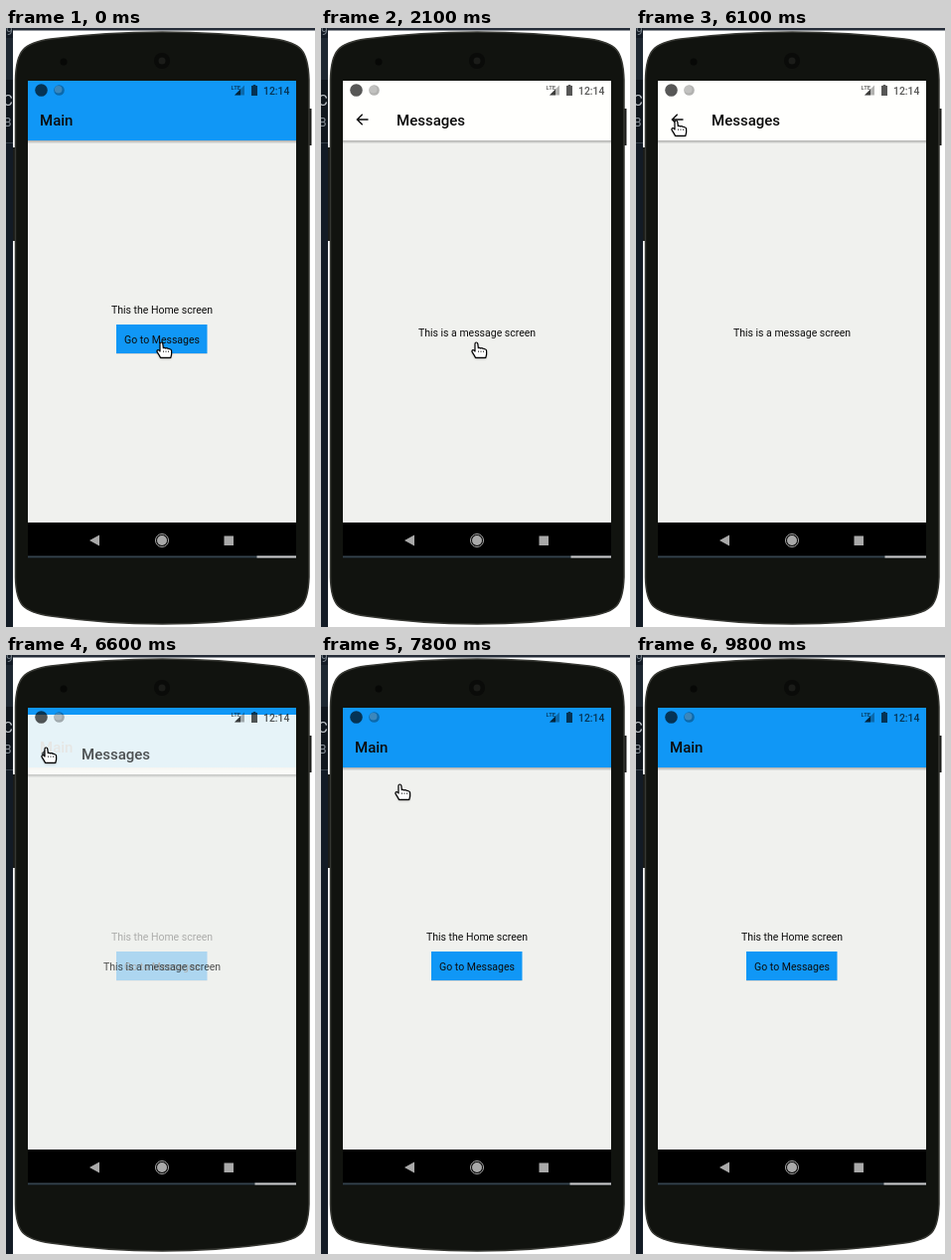
Animation, 311 px wide and 602 px high, one loop 9.9 s. Source, as an HTML page with a canvas:

```html
<!DOCTYPE html>
<html lang="en">
<head>
<meta charset="utf-8">
<title>Phone navigation</title>
<style>
html, body { margin: 0; width: 100%; height: 100%; overflow: hidden; background: #fff; }
canvas { display: block; }
</style>
</head>
<body>
<canvas id="stage" width="311" height="602"></canvas>
<script>
const ctx = document.getElementById('stage').getContext('2d');
const LOOP = 9900, STEP = 100;
const SCREEN = { x: 22, y: 53, w: 270, h: 480 };
const BLUE = '#1097f6', PAPER = '#f0f1ee', INK = '#0c0c0c';

// Pointer stops: time, left, top
const POINTER = [
  [0, 151, 315], [4400, 151, 315], [4500, 151, 314], [4600, 143, 300],
  [4800, 90, 203], [4900, 81, 186], [5100, 81, 186], [5200, 81, 185],
  [5300, 81, 185], [5500, 66, 155], [5700, 43, 106], [5800, 39, 98],
  [5900, 39, 98], [6100, 35, 92], [6800, 35, 92], [7300, 62, 217],
  [7700, 62, 217], [7800, 74, 129], [8000, 76, 84], [8100, 76, 84],
  [8600, 42, 24], [8900, 52, 32], [9000, 52, 32], [9100, 46, 23]
];
const POINTER_GONE = 9200;

// Messages card: start time, opacity, downward offset
const CARD = [
  [0, 0, 0], [1300, 0.08, 28], [1500, 0.85, 4], [1600, 1, 0],
  [6600, 0.7, 7], [6700, 0.12, 22], [6800, 0, 0]
];

// Start of the light part of the bottom line
const LINE = [[0, 252.5], [2100, 251.5], [5500, 250.5], [8500, 249.5]];

const current = (list, t) => list.filter(k => k[0] <= t).pop();

function rect(x, y, w, h, fill) {
  ctx.fillStyle = fill;
  ctx.fillRect(x, y, w, h);
}

function disc(x, y, r, fill) {
  ctx.fillStyle = fill;
  ctx.beginPath();
  ctx.arc(x, y, r, 0, Math.PI * 2);
  ctx.fill();
}

function poly(points, fill) {
  ctx.fillStyle = fill;
  ctx.beginPath();
  points.forEach(([x, y]) => ctx.lineTo(x, y));
  ctx.closePath();
  ctx.fill();
}

function text(str, x, y, size, weight = 400, fill = INK, align = 'left') {
  ctx.font = `${weight} ${size}px Roboto, sans-serif`;
  ctx.textAlign = align;
  ctx.fillStyle = fill;
  ctx.fillText(str, x, y);
}

function shade(x, y, w, h, alpha) {
  const g = ctx.createLinearGradient(0, y, 0, y + h);
  g.addColorStop(0, `rgba(0,0,0,${alpha})`);
  g.addColorStop(1, 'rgba(0,0,0,0)');
  rect(x, y, w, h, g);
}

function drawBackdrop() {
  rect(0, 0, 311, 602, '#fff');
  rect(0, 0, 311, 2.5, '#252c38');
  rect(0, 0, 7, 602, '#131b25');
  rect(0, 10, 7, 42, '#1d2731');
  rect(0, 52, 7, 63, '#10161d');
  rect(0, 115, 7, 1, '#3a434c');
  text('9', 0, 7, 12, 400, '#77808a');
  ctx.save();
  ctx.beginPath();
  ctx.rect(0, 0, 7, 116);
  ctx.clip();
  text('C', -3, 78, 15, 400, '#c3c8cd');
  text('B', -2, 99, 12, 400, '#8a929a');
  ctx.restore();
}

function drawPhone() {
  rect(304, 81, 3.5, 37, '#1a1b18');
  rect(7, 120, 4, 94, '#1a1b18');
  ctx.beginPath();
  ctx.moveTo(9.5, 52);
  ctx.bezierCurveTo(10, 22, 18, 15, 45, 11);
  ctx.quadraticCurveTo(157, -3, 270, 11);
  ctx.bezierCurveTo(297, 15, 304, 22, 305, 52);
  ctx.lineTo(305, 552);
  ctx.bezierCurveTo(304, 580, 298, 587, 270, 591);
  ctx.quadraticCurveTo(157, 607, 45, 591);
  ctx.bezierCurveTo(17, 587, 10, 580, 9.5, 552);
  ctx.closePath();
  ctx.fillStyle = '#11130f';
  ctx.fill();
  ctx.strokeStyle = '#363732';
  ctx.lineWidth = 1.5;
  ctx.stroke();
  disc(58, 34, 3.5, '#070806');
  disc(157, 33, 8, '#0a0b09');
  disc(157, 33, 3.5, '#1b1c19');
}

function drawHeader(fill) {
  rect(22, 53, 270, 60, fill);
  shade(22, 113, 270, 3.5, 0.28);
}

function drawHome() {
  rect(22, 53, 270, 444, PAPER);
  drawHeader(BLUE);
  text('Main', 34, 98, 15, 500);
  text('This the Home screen', 157, 287, 10.5, 400, INK, 'center');
  shade(111, 327, 91.5, 1.5, 0.15);
  rect(111, 298, 91.5, 29, BLUE);
  text('Go to Messages', 157, 316.5, 10.5, 400, INK, 'center');
}

function drawMessages(alpha, offset) {
  ctx.save();
  ctx.globalAlpha = alpha;
  ctx.translate(0, offset);
  rect(22, 53, 270, 444, PAPER);
  drawHeader('#fffffd');
  text('Messages', 76, 98, 15, 500);
  text('This is a message screen', 157, 309.5, 10.5, 400, INK, 'center');
  ctx.strokeStyle = INK;
  ctx.lineWidth = 1.4;
  ctx.beginPath();
  ctx.moveTo(47.5, 92);
  ctx.lineTo(36.5, 92);
  ctx.moveTo(41.7, 86.7);
  ctx.lineTo(36.4, 92);
  ctx.lineTo(41.7, 97.3);
  ctx.stroke();
  ctx.restore();
}

function drawStatus() {
  const dark = 'rgba(0,0,0,.66)', mid = 'rgba(0,0,0,.3)';
  disc(35.5, 62.5, 6.3, dark);
  disc(53.5, 62.5, 5.3, mid);
  disc(52.7, 61.7, 3.8, 'rgba(255,255,255,.2)');
  text('LTE', 226.5, 61.5, 6, 500, dark);
  poly([[240, 57.5], [240, 67.5], [230, 67.5]], mid);
  poly([[236, 61.5], [236, 67.5], [230, 67.5]], dark);
  rect(247, 58, 6, 10, dark);
  rect(248.7, 57, 2.6, 1, dark);
  text('12:14', 259, 66.5, 10.4, 500, dark);
}

function drawNav(split) {
  const grey = '#a9a9a9';
  rect(22, 497, 270, 36, '#000');
  poly([[84, 515], [94, 509.5], [94, 520.5]], grey);
  disc(157, 515, 5, grey);
  ctx.strokeStyle = grey;
  ctx.lineWidth = 1;
  ctx.beginPath();
  ctx.arc(157, 515, 6.5, 0, Math.PI * 2);
  ctx.stroke();
  rect(219.5, 510.5, 9.5, 9.5, grey);
  rect(22, 530.5, 270, 2, '#34434d');
  rect(split, 530.5, 292 - split, 2, '#c9c9c9');
}

function pointerAt(t) {
  const i = POINTER.findIndex(k => k[0] > t);
  if (i < 0) return POINTER[POINTER.length - 1].slice(1);
  const [t0, x0, y0] = POINTER[i - 1], [t1, x1, y1] = POINTER[i];
  const p = (t - t0) / (t1 - t0);
  return [Math.round(x0 + (x1 - x0) * p), Math.round(y0 + (y1 - y0) * p)];
}

function drawPointer(x, y) {
  const hand = new Path2D(
    'M4 9V2.4Q4 1 5.3 1Q6.6 1 6.8 2.4L7.3 6.6Q8.6 5.8 9.7 7Q11 6.3 12.2 7.4' +
    'Q13.4 6.9 14.3 8Q15.6 8 15.6 9.6V13L14.8 16.4H4.6L2.9 13.4L1 10.4' +
    'Q.6 9 2 8.7Q3 8.6 4 10Z');
  ctx.save();
  ctx.translate(x, y);
  ctx.save();
  ctx.shadowColor = 'rgba(0,0,0,.4)';
  ctx.shadowBlur = 2;
  ctx.shadowOffsetY = 1;
  ctx.fillStyle = '#fff';
  ctx.fill(hand);
  ctx.restore();
  ctx.strokeStyle = '#000';
  ctx.lineWidth = 1.2;
  ctx.lineJoin = 'round';
  ctx.stroke(hand);
  [7, 9.5, 12].forEach(dx => rect(dx, 9.5, 1, 1.3, '#333'));
  ctx.restore();
}

function draw(t) {
  const [, alpha, offset] = current(CARD, t);
  drawBackdrop();
  drawPhone();
  ctx.save();
  ctx.beginPath();
  ctx.rect(SCREEN.x, SCREEN.y, SCREEN.w, SCREEN.h);
  ctx.clip();
  if (alpha < 1) drawHome();
  if (alpha > 0) drawMessages(alpha, offset);
  drawStatus();
  drawNav(current(LINE, t)[1]);
  ctx.restore();
  if (t < POINTER_GONE) drawPointer(...pointerAt(t));
}

const start = performance.now();
function tick() {
  const t = (performance.now() - start) % LOOP;
  draw(Math.floor(t / STEP) * STEP);
  requestAnimationFrame(tick);
}
tick();
</script>
</body>
</html>
```
